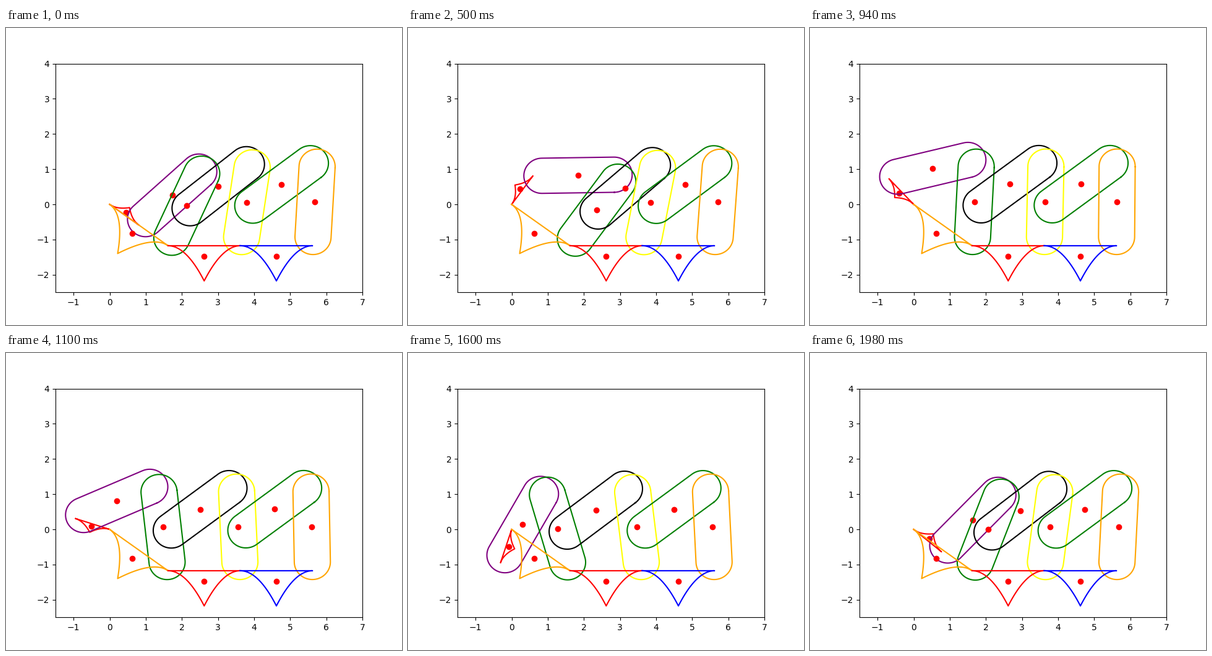
Write a matplotlib script that moves like this. It is 640x480 px and loops after 2 s.

```python
import numpy as np
import matplotlib.pyplot as plt
from matplotlib.animation import FuncAnimation

FRAMES = 100
LINK = 2.5      # pin-to-pin length of couplers and rockers
JOINT = 1.0     # distance along a rocker where the next coupler attaches
TILT = -0.2 * np.pi


def unit(angle):
    return np.array([np.cos(angle), np.sin(angle)])


def cusp(length, side):
    """Straight base closed by two mirrored parabolas meeting at a cusp."""
    x = np.linspace(0, length, 101)
    y = side * np.minimum(x, length - x) ** 2
    outline = np.column_stack([np.append(x, 0), np.append(y, 0)])
    return outline, np.array([length / 2, side * 0.3 * (length / 2) ** 2])


def capsule(length, radius=0.5, inset=0.25):
    """Rounded bar whose arcs are centred slightly inside the pins."""
    t = np.linspace(-np.pi / 2, np.pi / 2, 40)
    right = np.column_stack([length - inset + radius * np.cos(t), radius * np.sin(t)])
    left = np.column_stack([inset - radius * np.cos(t), -radius * np.sin(t)])
    outline = np.vstack([right, left, right[:1]])
    return outline, np.array([length / 2, 0])


def place(points, start, end):
    """Map local points so the x axis runs from start towards end."""
    c, s = (end - start) / np.hypot(*(end - start))
    return points @ np.array([[c, s], [-s, c]]) + start


def meet(a, b):
    """Upper point at LINK distance from both a and b."""
    d = b - a
    dist = np.hypot(*d)
    normal = np.array([-d[1], d[0]]) / dist
    return (a + b) / 2 + normal * np.sqrt(LINK ** 2 - dist ** 2 / 4)


ORIGIN = np.zeros(2)
PIVOTS = [2 * unit(TILT) + np.array([2 * k, 0]) for k in range(3)]


def pins(angle):
    """End points of every link, in drawing order."""
    start = unit(angle)
    ends = [(ORIGIN, start)]
    base = ORIGIN
    for pivot in PIVOTS:
        top = meet(start, pivot)
        ends += [(start, top), (pivot, top), (base, pivot)]
        start = pivot + (top - pivot) * JOINT / LINK
        base = pivot
    return ends


bar, ground = capsule(LINK), cusp(2, -1)
parts = [
    (cusp(1, 1), "red"),
    (bar, "purple"), (bar, "green"), (ground, "orange"),
    (bar, "black"), (bar, "yellow"), (ground, "red"),
    (bar, "green"), (bar, "orange"), (ground, "blue"),
]

fig, ax = plt.subplots(figsize=(6.4, 4.8), dpi=100)
ax.set_xlim(-1.5, 7)
ax.set_ylim(-2.5, 4)

artists = []
for _, color in parts:
    line, = ax.plot([], [], color=color)
    dot, = ax.plot([], [], "o", color="red")
    artists.append((line, dot))


def update(i):
    angle = TILT + 2 * np.pi * i / FRAMES
    for ((outline, centre), _), (line, dot), (a, b) in zip(parts, artists, pins(angle)):
        line.set_data(*place(outline, a, b).T)
        dot.set_data(*place(centre[None], a, b).T)
    return [artist for pair in artists for artist in pair]


anim = FuncAnimation(fig, update, frames=FRAMES, interval=20, repeat=True, repeat_delay=0)
plt.show()
```
